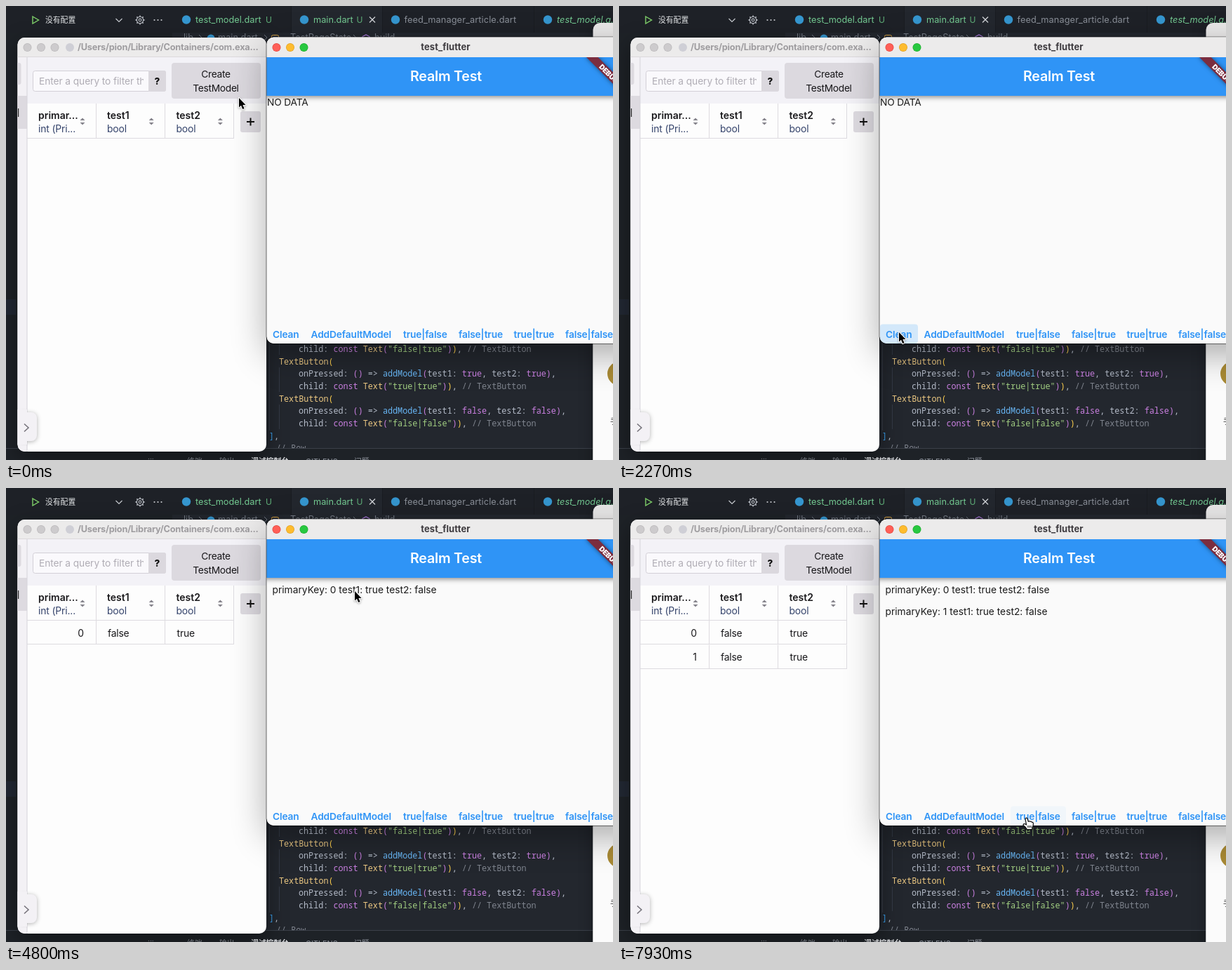
Animation, 865 px wide and 647 px high, one loop 8 s. Source, as an HTML page with a canvas:

```html
<!DOCTYPE html>
<html lang="en">
<head>
<meta charset="utf-8">
<title>Realm Test</title>
<style>
html, body { margin: 0; width: 100%; height: 100%; overflow: hidden; background: #1e2227; }
canvas { display: block; width: 865px; height: 647px; }
</style>
</head>
<body>
<canvas id="stage"></canvas>
<script>
const W = 865, H = 647, LOOP = 8000;
const UI = 'Inter, "Noto Sans CJK SC", "Noto Sans CJK", sans-serif';
const MONO = '"Noto Sans Mono", "DejaVu Sans Mono", monospace';
const BLUE = '#2f94f6', GREEN = '#73c991', GRAY = '#8a8f98', CRUMB = '#737983';
const dpr = window.devicePixelRatio || 1;

function setup(canvas) {
  canvas.width = W * dpr;
  canvas.height = H * dpr;
  const c = canvas.getContext('2d');
  c.scale(dpr, dpr);
  return c;
}

const screen = setup(document.getElementById('stage'));
const backdrop = document.createElement('canvas');
let g = setup(backdrop);

function text(s, x, y, font, color, spacing = 0, align = 'left') {
  g.font = font;
  g.fillStyle = color;
  g.letterSpacing = spacing + 'px';
  g.textAlign = align;
  g.fillText(s, x, y);
}
const ui = (size, weight = 400) => `${weight} ${size}px ${UI}`;

function rect(x, y, w, h, color) {
  g.fillStyle = color;
  g.fillRect(x, y, w, h);
}

function box(x, y, w, h, r, fill, stroke) {
  g.beginPath();
  g.roundRect(x, y, w, h, r);
  if (fill) { g.fillStyle = fill; g.fill(); }
  if (stroke) { g.strokeStyle = stroke; g.lineWidth = 1; g.stroke(); }
}

function dot(x, y, r, color) {
  g.fillStyle = color;
  g.beginPath();
  g.arc(x, y, r, 0, Math.PI * 2);
  g.fill();
}

function poly(points, { fill, stroke, width = 1, close = false }) {
  g.beginPath();
  points.forEach(([x, y]) => g.lineTo(x, y));
  if (close) g.closePath();
  if (fill) { g.fillStyle = fill; g.fill(); }
  if (stroke) { g.strokeStyle = stroke; g.lineWidth = width; g.stroke(); }
}

function shadowed(blur, dy, alpha, draw) {
  g.save();
  g.shadowColor = `rgba(0,0,0,${alpha})`;
  g.shadowBlur = blur * dpr;
  g.shadowOffsetY = dy * dpr;
  draw();
  g.restore();
}

function clipped(x, y, w, h, r, draw) {
  g.save();
  g.beginPath();
  g.roundRect(x, y, w, h, r);
  g.clip();
  draw();
  g.restore();
}

// Editor behind the windows
function codeLine(src, x, y, state) {
  const size = 11.76, step = size * 0.6;
  const pattern = /\/\/.*|"[^"]*"|\b(?:const|true|false)\b|Text\w*|addModel|\S/g;
  for (const m of src.matchAll(pattern)) {
    const s = m[0];
    let color = '#b4bbc8';
    if (s.startsWith('//')) color = '#7f848e';
    else if (s[0] === '"') color = '#a2cf82';
    else if (/^(const|true|false)$/.test(s)) color = '#cb80e2';
    else if (s.startsWith('Text')) color = '#ecc882';
    else if (s === 'addModel') color = '#68b6f5';
    else if (s === '(') color = state.depth++ ? '#cb80e2' : '#ffd04d';
    else if (s === ')') color = --state.depth ? '#cb80e2' : '#ffd04d';
    else if (s === ']') color = '#3aa2f0';
    text(s, x + m.index * step, y, `500 ${size}px ${MONO}`, color);
  }
}

function editorTabs() {
  rect(0, 0, W, 38, '#1e2127');
  rect(407, 0, 129, 38, '#23272e');
  for (const x of [406, 536, 752]) rect(x, 0, 1, 38, '#191c21');

  poly([[38, 15], [46.5, 20], [38, 25]], { stroke: '#7fd06a', width: 1.4, close: true });
  text('没有配置', 56, 24, ui(10.8, 500), '#e6e8ea');
  poly([[156.5, 18], [161, 22.5], [165.5, 18]], { stroke: '#c5c8cd', width: 1.2 });

  g.strokeStyle = '#b9bdc4';
  g.lineWidth = 1.6;
  for (let i = 0; i < 8; i++) {
    const a = i * Math.PI / 4, cx = Math.cos(a), sy = Math.sin(a);
    g.beginPath();
    g.moveTo(191 + cx * 4.6, 20 + sy * 4.6);
    g.lineTo(191 + cx * 6.6, 20 + sy * 6.6);
    g.stroke();
  }
  g.lineWidth = 1.1;
  for (const r of [4.7, 1.9]) {
    g.beginPath();
    g.arc(191, 20, r, 0, 7);
    g.stroke();
  }
  for (const x of [211.5, 216.5, 221.5]) dot(x, 20, 1.1, '#c5c8cd');

  for (const x of [257, 425, 555, 772]) dot(x, 19.5, 6.2, '#3596cf');
  text('test_model.dart', 270, 23.5, ui(12.75), GREEN);
  text('U', 370, 23.5, ui(12), '#5faf78');
  text('main.dart', 438, 23.5, ui(12.75), GREEN);
  text('U', 499.5, 23.5, ui(12), '#5faf78');
  poly([[518, 15.5], [526, 23.5]], { stroke: '#d3d6da', width: 1.2 });
  poly([[526, 15.5], [518, 23.5]], { stroke: '#d3d6da', width: 1.2 });
  text('feed_manager_article.dart', 567.5, 23.5, ui(12.75), GRAY, 0.1);
  text('test_model.g.dart', 785, 23.5, 'italic ' + ui(12.75), GREEN);
}

function editor() {
  rect(0, 0, W, H, '#1e2227');
  rect(237, 38, 600, 593, '#23272e');
  rect(0, 418, 14, 22, '#222833');
  editorTabs();

  text('lib', 253, 49, ui(12.75), CRUMB);
  text('main.dart', 302, 49, ui(12.75), CRUMB);
  text('_TestPageState', 400, 49, ui(12.75), CRUMB);
  text('build', 525, 49, ui(12.75), CRUMB);
  for (const x of [275, 368, 495]) {
    poly([[x, 41], [x + 4, 45], [x, 49]], { stroke: CRUMB });
  }
  dot(292, 46, 5.5, '#3596cf');
  box(378.5, 41.5, 10, 9, 2, null, '#d9a343');
  poly([[508, 43.5], [513, 41], [518, 43.5], [518, 49], [508, 49]],
    { stroke: '#a877d8', width: 1.2, close: true });

  clipped(371, 470, 466, 160, 0, () => {
    rect(375, 470, 1, 135, '#343a45');
    rect(389, 470, 1, 27, '#343a45');
    rect(389, 515, 1, 35, '#343a45');
    rect(389, 568, 1, 35, '#343a45');
    const block = (a, b) => [
      [389, 'TextButton('],
      [417, `onPressed: () => addModel(test1: ${a}, test2: ${b}),`],
      [417, `child: const Text("${a}|${b}")), // TextButton`]
    ];
    const lines = [
      block(false, true)[2], ...block(true, true), ...block(false, false),
      [375, '],'], [385, '// Row']
    ];
    const state = { depth: 1 };
    lines.forEach(([x, src], i) => codeLine(src, x, 493 + i * 17.67, state));
  });

  rect(0, 630, 837, 1, '#3b4049');
  rect(0, 631, 837, 16, '#1e2227');
  const panel = [['终端', 258], ['输出', 304], ['GITLENS', 427], ['问题', 496]];
  for (const [s, x] of panel) text(s, x, 652.5, ui(10.8), '#8d929b');
  text('调试控制台', 349, 652.5, ui(10.8, 600), '#e3e5e8');
  text('...', 202, 646, ui(10), '#8d929b');
}

function sideWindow() {
  shadowed(20, 4, 0.3, () => box(836.5, 24, 120, 700, [10, 0, 0, 0], '#e9e8e8'));
  rect(836.5, 73, 29, 574, '#fbfbfb');
  dot(874, 524, 17, '#a98a35');
  text('手', 861, 596, ui(11), '#333');
}

// Data browser on the left
const BROWSER = [16.5, 45, 354.5, 590, 10];

function sortIcon(x, y) {
  const fill = '#85838b';
  poly([[x - 3.5, y - 1.5], [x, y - 5], [x + 3.5, y - 1.5]], { fill });
  poly([[x - 3.5, y + 1.5], [x, y + 5], [x + 3.5, y + 1.5]], { fill });
}

function browserContent() {
  rect(16, 45, 355, 28, '#ecebeb');
  rect(16, 72, 355, 1, '#dcd9dc');
  for (const x of [30.5, 50, 69.5]) {
    dot(x, 59, 6, '#bbb9bb');
    dot(x, 59, 5.2, '#cdcbcd');
  }
  dot(91, 59, 6, '#cfcfd6');
  text('/Users/pion/Library/Containers/com.exa...', 102, 63, ui(12.75, 700), '#9f9da0', -0.22);

  rect(16, 73, 14, 562, '#f3f1f5');
  box(14, 81, 7.5, 31, 3, '#dddae0');
  rect(16, 128, 14, 47, '#dddae0');
  rect(17, 146, 1.2, 12, '#222');
  rect(30, 73, 341, 66, '#f3f2f7');
  rect(29.5, 73, 1, 562, '#d6d3d9');

  box(38.5, 92.5, 189, 29, 3, '#faf9fc', '#d3d0d7');
  box(203, 92, 25, 30, [0, 3, 3, 0], '#dbd8de');
  clipped(39, 93, 157, 28, 0, () =>
    text('Enter a query to filter the results', 47, 112, ui(13.75), '#b0adb5', -0.08));
  text('?', 215.5, 112, ui(13.5, 800), '#111', 0, 'center');

  box(236, 81, 127, 51, 4, '#dcd9df');
  text('Create', 299, 101.5, ui(13.75), '#18171a', -0.3, 'center');
  text('TestModel', 299, 122, ui(13.75), '#18171a', -0.3, 'center');

  const heads = [['primar...', 'int (Pri...', 46], ['test1', 'bool', 144], ['test2', 'bool', 242.5]];
  heads.forEach(([name, type, x], i) => {
    text(name, x, 160.5, ui(14, 600), '#1a191c');
    text(type, x, 180, ui(13.9), '#34436b', -0.15);
    sortIcon(109 + i * 98.2, 164.5);
  });
  rect(30, 188, 295, 1, '#dddbe0');
  for (const x of [128, 226, 324]) rect(x, 139, 1, 49, '#dddbe0');

  box(334, 150, 29, 30, 3, '#dedbe1');
  rect(343, 164, 11, 2, '#111');
  rect(347.5, 159.5, 2, 11, '#111');

  shadowed(6, 1, 0.3, () => box(20, 579, 24, 41, [0, 8, 8, 0], '#f3f1f5'));
  rect(16, 575, 14, 50, '#f3f1f5');
  poly([[26, 595.5], [32, 601], [26, 606.5]], { stroke: '#77747c', width: 1.6 });
}

function browserWindow() {
  shadowed(30, 8, 0.4, () => box(...BROWSER, '#fdfdfd'));
  clipped(...BROWSER, browserContent);
}

// App window in front
const APP = [371.5, 44.5, 600, 436.5, 10];

function debugBanner() {
  g.save();
  g.translate(882.5, 73);
  g.rotate(Math.PI / 4);
  g.scale(0.98, 0.98);
  shadowed(6, 0, 0.5, () => rect(-40, 28, 80, 12, '#7b2d3f'));
  text('DEBUG', 0, 37.7, ui(10.2, 900), '#fff', -0.2, 'center');
  g.restore();
}

function appContent() {
  rect(371, 128, 494, 353, '#fafafa');
  shadowed(7, 2, 0.45, () => rect(360, 73, 540, 55, BLUE));
  rect(371, 44, 494, 29, '#ecebeb');
  [['#ff5f57', '#e2463f', 385.5], ['#febc2e', '#dfa023', 405], ['#28c840', '#1dad2c', 424.5]]
    .forEach(([fill, rim, x]) => { dot(x, 59, 6, rim); dot(x, 59, 5.3, fill); });
  text('test_flutter', 626.5, 63, ui(12.9, 700), '#3d3a3e', 0.1, 'center');
  text('Realm Test', 627, 107, ui(19.6, 600), '#fff', -0.2, 'center');
  clipped(371, 73, 494, 408, 0, debugBanner);
}

function appWindow() {
  shadowed(50, 16, 0.32, () => box(...APP, '#fafafa'));
  box(371, 44, 601, 437.5, 10.5, null, 'rgba(0,0,0,.5)');
  clipped(...APP, appContent);
}

// Moving parts
const buttons = [
  ['Clean', 372, 426], ['AddDefaultModel', 426.5, 558], ['true|false', 558, 637],
  ['false|true', 637, 715.5], ['true|true', 715.5, 789], ['false|false', 789, 872]
];
const clicks = [[2060, 0], [3500, 1], [5950, 1]];
const path = [
  [0, 332, 131], [120, 332, 131], [1330, 427, 433], [1850, 399, 465], [2750, 399, 465],
  [3250, 503, 466], [3950, 503, 466], [4600, 497, 147], [5050, 497, 147],
  [5750, 521, 463], [7000, 521, 463], [7600, 581, 470], [8000, 581, 470]
];

function pointerAt(t) {
  const i = Math.max(1, path.findIndex(p => p[0] > t));
  const [t0, x0, y0] = path[i - 1], [t1, x1, y1] = path[i];
  const u = (t - t0) / (t1 - t0), e = u * u * (3 - 2 * u);
  return [x0 + (x1 - x0) * e, y0 + (y1 - y0) * e];
}

function arrow(x, y) {
  g.save();
  g.translate(x, y);
  g.lineJoin = 'round';
  const shape = [[0, 0], [0, 13.5], [3, 10.8], [5.2, 16], [7.6, 15], [5.4, 10], [9.6, 10]];
  shadowed(3, 1, 0.35, () => poly(shape, { stroke: '#fff', width: 2, close: true }));
  poly(shape, { fill: '#000', close: true });
  g.restore();
}

function hand(x, y) {
  g.save();
  g.translate(x, y);
  g.lineJoin = 'round';
  g.beginPath();
  g.moveTo(-2, 1.5);
  g.quadraticCurveTo(-0.5, -1, 1, 1.2);
  g.lineTo(2.4, 5.5);
  g.quadraticCurveTo(4, 4, 5, 5.6);
  g.quadraticCurveTo(6.6, 4.6, 7.4, 6.4);
  g.quadraticCurveTo(9.4, 6, 9.4, 8.5);
  g.quadraticCurveTo(9.5, 12, 7.8, 14);
  g.lineTo(7.8, 16.5);
  g.lineTo(0.5, 16.5);
  g.quadraticCurveTo(-1.5, 13, -5, 10.5);
  g.quadraticCurveTo(-5, 8, -2, 9);
  g.lineTo(-0.4, 10);
  g.closePath();
  g.fillStyle = '#fff';
  g.strokeStyle = '#111';
  g.lineWidth = 1.2;
  shadowed(3, 1, 0.35, () => g.fill());
  g.stroke();
  for (const i of [0, 1, 2]) {
    poly([[1.8 + i * 2.1, 11], [1.8 + i * 2.1, 14.2]], { stroke: '#111' });
  }
  g.restore();
}

function buttonRow(t, x, y) {
  clipped(...APP, () => {
    for (const [i, [label, x0, x1]] of buttons.entries()) {
      clipped(x0, 453.5, x1 - x0, 27.5, 4, () => {
        if (y > 453 && x >= x0 && x < x1) rect(x0, 453, x1 - x0, 28, 'rgba(33,150,243,.04)');
        for (const [at, button] of clicks) {
          const age = t - at;
          if (button !== i || age < 0 || age > 500) continue;
          const alpha = 0.14 * Math.min(1, (500 - age) / 200);
          dot(x, y, age * 0.27, `rgba(33,150,243,${alpha})`);
        }
      });
      text(label, x0 + 8, 473, ui(13.75, 600), BLUE, -0.13);
    }
  });
}

function records(count) {
  if (!count) text('NO DATA', 372, 141.5, ui(13.75), '#1b1b1b', -0.15);
  for (let i = 0; i < count; i++) {
    text(`primaryKey: ${i} test1: true test2: false`, 379.5, 149.5 + i * 31.5,
      ui(13.75), '#1b1b1b', 0.02);
    const y = 189 + i * 34.5;
    text(String(i), 111, y + 22.5, ui(13.9), '#1a191c', 0, 'right');
    text('false', 145, y + 22.5, ui(13.9), '#1a191c', -0.2);
    text('true', 243.5, y + 22.5, ui(13.9), '#1a191c', -0.15);
    rect(30, Math.round(y + 33.4), 295, 1, '#dddbe0');
    for (const x of [128, 226, 324]) rect(x, y, 1, 34, '#dddbe0');
  }
}

editor();
sideWindow();
browserWindow();
appWindow();
g = screen;

function frame(now) {
  const t = now % LOOP;
  const [x, y] = pointerAt(t);
  g.drawImage(backdrop, 0, 0, W, H);
  records(t < 3750 ? 0 : t < 6200 ? 1 : 2);
  buttonRow(t, x, y);
  (t > 5600 && y > 453 ? hand : arrow)(x, y);
  requestAnimationFrame(frame);
}
requestAnimationFrame(frame);
</script>
</body>
</html>
```
